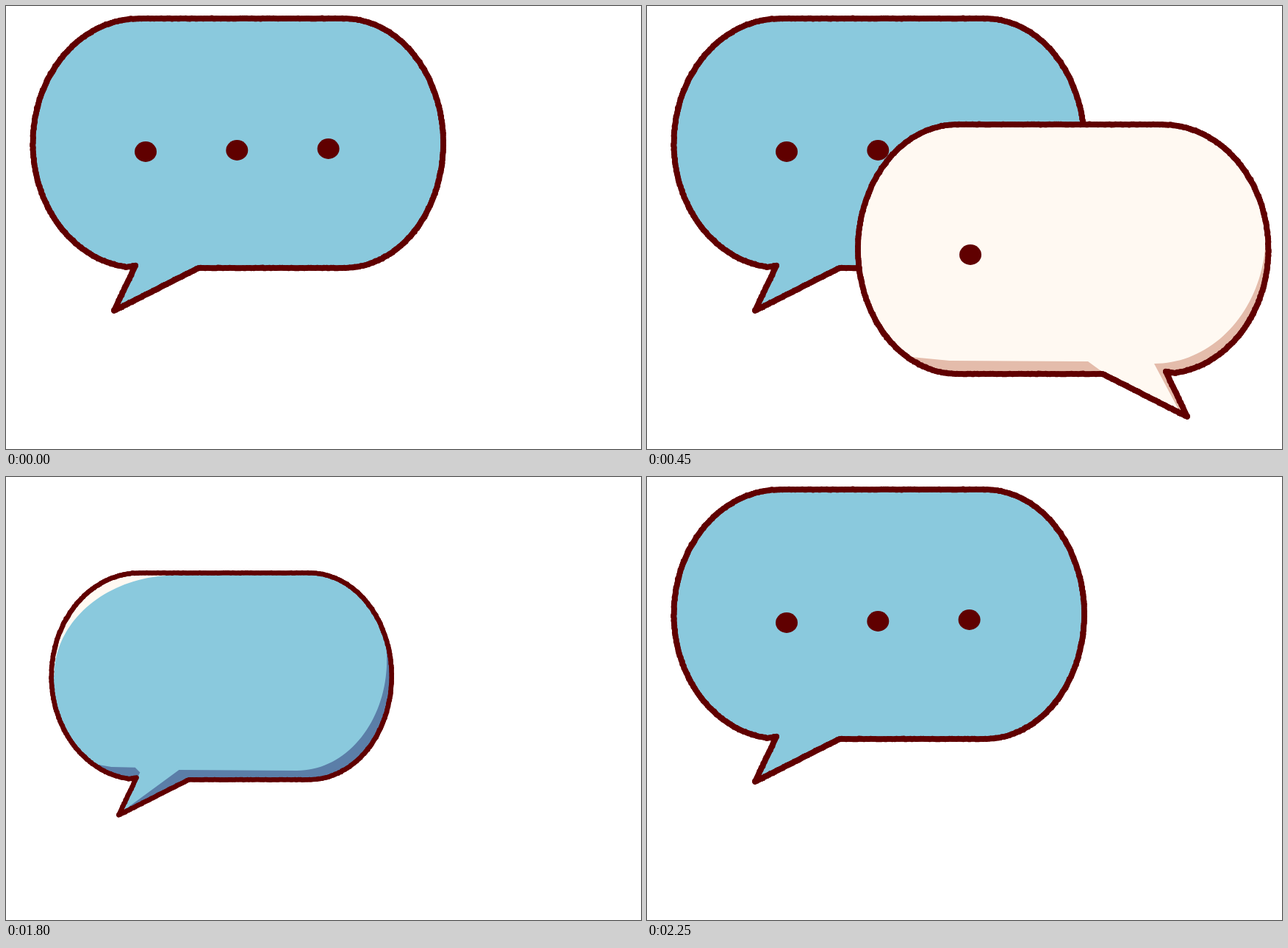
Animation of 864 by 602 pixels, one loop 2.4 s. Source, as an HTML page with a canvas:

```html
<!DOCTYPE html>
<html lang="en">
<head>
<meta charset="utf-8">
<title>Chat bubbles</title>
<style>
html, body { margin: 0; width: 100%; height: 100%; overflow: hidden; background: #fff; }
canvas { display: block; }
</style>
</head>
<body>
<canvas id="stage" width="864" height="602"></canvas>
<script>
const ctx = document.getElementById('stage').getContext('2d');
const INK = '#600000', BLUE = '#8ac9dd', NAVY = '#5b7ea8', CREAM = '#fff9f2', PINK = '#e4bcab';
const STEP = 150, LOOP = 2400, PI = Math.PI;

// Points along part of an ellipse, from angle a to angle b
function arc(cx, cy, rx, ry, a, b, n = 40) {
  return Array.from({ length: n + 1 }, (_, i) => {
    const t = a + (b - a) * i / n;
    return [cx + rx * Math.cos(t), cy + ry * Math.sin(t)];
  });
}

function shape(...pts) {
  const path = new Path2D();
  pts.forEach(p => path.lineTo(...p));
  path.closePath();
  return path;
}

// One bubble: two elliptical caps and a tail
const MID = 186.5, HALF = 169.5;
const edge = [
  ...arc(460, MID, 135, HALF, -PI / 2, PI / 2),
  [262, 356], [147, 414], [176, 353],
  ...arc(181, MID, 144.5, HALF, PI * 0.54, PI * 1.5)
];
const outline = shape(...edge);

// Small bumps that give the outline its brushed edge
let seed = 7;
const rand = () => (seed = seed * 16807 % 2147483647) / 2147483647;
const grain = new Path2D();
edge.forEach(([x, y], i) => {
  const [u, v] = edge[(i + 1) % edge.length];
  const len = Math.hypot(u - x, v - y);
  for (let s = 0; s < len; s += 3) {
    const px = x + (u - x) * s / len + rand() - 0.5;
    const py = y + (v - y) * s / len + rand() - 0.5;
    grain.moveTo(px + 3.9, py);
    grain.arc(px, py, 3.9, 0, 2 * PI);
  }
});

const blueShades = [
  shape(...arc(440, 160, 147, 181, -0.2, PI / 2), [246, 340], [160, 403], [146, 430], [640, 430], [640, 124]),
  shape([100, 329], [135, 335], [174, 336], [182, 344], [175, 358], [90, 358])
];
const blueShine = shape(...arc(240, 185, 199, 164, PI, PI * 1.5), [0, 0], [0, 185]);
const whiteShades = [
  shape(...arc(192, 166, 152, 176, PI, PI / 2), [160, 402], [150, 440], [0, 440], [0, 166]),
  shape([522, 333], [470, 338], [282, 339], [260, 355], [260, 380], [540, 380])
];

function fill(color, ...paths) {
  ctx.fillStyle = color;
  paths.forEach(p => ctx.fill(p));
}

function inside(draw) {
  ctx.save();
  ctx.clip(outline);
  draw();
  ctx.restore();
}

function ink() {
  ctx.strokeStyle = INK;
  ctx.lineWidth = 7.6;
  ctx.lineJoin = 'round';
  ctx.stroke(outline);
  fill(INK, grain);
}

function dots(xs, count) {
  xs.slice(0, count).forEach((x, i) => {
    ctx.beginPath();
    ctx.ellipse(x, 198 - (x - xs.min) / 62, 15, 13.9, 0, 0, 2 * PI);
    ctx.fill();
  });
}
const row = (x, gap) => Object.assign([0, 1, 2].map(i => x + gap * i), { min: Math.min(x, x + 2 * gap) });
const blueDots = row(190, 124.3), whiteDots = row(442, -124);

function place([s, x, y], draw) {
  ctx.save();
  ctx.transform(s, 0, 0, s, x, y);
  draw();
  ctx.restore();
}

function blue(pose, count, shaded) {
  place(pose, () => {
    fill(BLUE, outline);
    if (shaded) inside(() => {
      fill(NAVY, ...blueShades);
      fill(CREAM, blueShine);
    });
    ink();
    dots(blueDots, count);
  });
}

// The white bubble is the same shape, mirrored and lower
function white(pose, count) {
  place(pose, () => {
    ctx.transform(-1, 0, 0, 1, 882, 144);
    fill(CREAM, outline);
    inside(() => fill(PINK, ...whiteShades));
    ink();
    dots(whiteDots, count);
  });
}

const FULL = [1, 0, 0];
const bluePoses = [[0.596, 68.9, 256.6], [0.829, 31.5, 116.2], FULL];
const whitePoses = [0.582, 0.815, 1].map(s => [s, 683.5 * (1 - s), 751 * (1 - s)]);
const clamp = (v, max) => Math.max(0, Math.min(v, max));

function render(ms) {
  const step = Math.floor(ms % LOOP / STEP);
  ctx.fillStyle = '#fff';
  ctx.fillRect(0, 0, 864, 602);
  if (step < 11) {
    blue(FULL, 3, false);
    if (step > 0) white(whitePoses[clamp(step - 1, 2)], clamp(step - 2, 3));
  } else {
    blue(bluePoses[clamp(step - 11, 2)], clamp(step - 12, 3), step < 14);
  }
}

let start;
function tick(now) {
  start ??= now;
  render(now - start);
  requestAnimationFrame(tick);
}
render(0);
requestAnimationFrame(tick);
</script>
</body>
</html>
```
